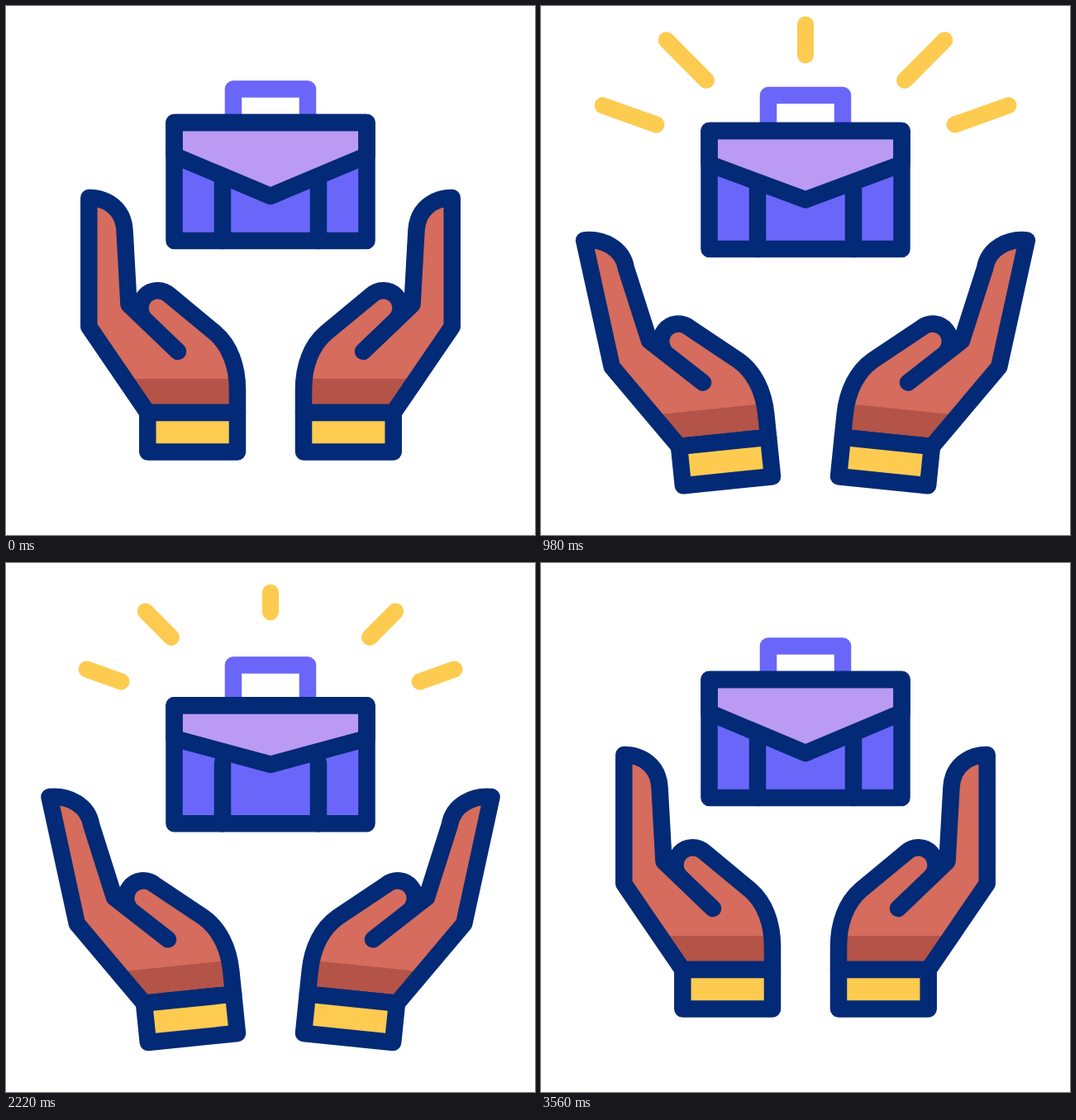
An HTML page that plays this animation: 640 by 640 pixels, repeating every 3600 ms.

```html
<!DOCTYPE html>
<html lang="en">
<head>
<meta charset="utf-8">
<title>Briefcase between two hands</title>
<style>
  html, body { margin: 0; width: 100%; height: 100%; overflow: hidden; background: #fff; }
  svg { display: block; width: 100%; height: 100%; }
  .line { stroke: #032a76; stroke-width: 20.5; stroke-linecap: round; stroke-linejoin: round; }
  .ray { stroke: #fdcb50; stroke-width: 20; stroke-linecap: round; }
</style>
</head>
<body>
<svg viewBox="0 0 640 640" fill="none">
  <g id="half">
    <path class="ray" data-ends="200 90 149 38.5"/>
    <path class="ray" data-ends="139.5 143.5 71 119"/>
    <g id="hand">
      <path id="skin" fill="#d56c5d"/>
      <path d="M143 451H280V492H171.3Z" fill="#b45348"/>
      <path id="outline" class="line"/>
      <path class="line" d="M171.3 492H280V539.6H171.3Z" fill="#fdcb50"/>
    </g>
  </g>
  <use href="#half" transform="matrix(-1 0 0 1 640 0)"/>
  <path class="ray" data-ends="320 59.5 320 20.5"/>
  <path id="handle" class="line" d="M275 146V100.5H365V146" style="stroke:#6a66fa"/>
  <g id="box">
    <path d="M203.5 141H436.5V284H203.5Z" fill="#6a66fa"/>
    <path class="line" d="M262 210V284M378 210V284"/>
    <path id="flap" class="line" fill="#ba9af2"/>
    <path class="line" d="M203.5 141H436.5V284H203.5Z"/>
  </g>
</svg>
<script>
const LOOP = 3600, HALF = 400, LAST_PEAK = 2800, RETURN = 480;
const $ = id => document.getElementById(id);
const ease = x => (1 - Math.cos(Math.PI * x)) / 2;
const clamp = x => Math.min(1, Math.max(0, x));

// Rises from rest to peak, swings between peak and low, then settles back to rest.
function swing(t, peak, low) {
  if (t <= HALF) return peak * ease(clamp(t / HALF));
  if (t >= LAST_PEAK) return peak * ease(1 - clamp((t - LAST_PEAK) / RETURN));
  return low + (peak - low) * ease(t / HALF);
}

function drawHand(t) {
  const drop = swing(t, 46.2, 17.3), angle = swing(t, 7, 5), lean = swing(t, 42, 0);
  const tip = 100.3 - lean, inner = -0.78 * lean;
  const d = `M${tip} 232L100.3 388L171.3 492H280V464C280 436 271 411 253 395.5L198 350` +
    `A21 21 0 0 0 169 380.5L148.5 361L${143.5 + inner} 271` +
    `C${142 + inner} 246 ${tip + 22.5} 232 ${tip} 232Z`;
  $('skin').setAttribute('d', d);
  $('outline').setAttribute('d', d + 'M148.5 361L208 418');
  $('hand').setAttribute('transform', `translate(0 ${drop}) rotate(${-angle} 280 539.6)`);
}

function drawCase(t) {
  const drop = swing(t - 60, 48, 0);
  $('box').setAttribute('transform', `translate(0 ${drop})`);
  $('handle').setAttribute('transform', `translate(0 ${0.735 * drop})`);
  $('flap').setAttribute('d', `M203.5 141H436.5V181L320 ${230 - 0.56 * drop}L203.5 181Z`);
}

function drawRays(t) {
  const u = t - 640, short = 0.61;
  const end = u < HALF ? ease(clamp(u / HALF)) : short + (1 - short) * ease(u / HALF);
  const start = ease(clamp((t - 3440) / 120));
  for (const ray of document.querySelectorAll('.ray')) {
    const [x1, y1, x2, y2] = ray.dataset.ends.split(' ').map(Number);
    const at = k => `${x1 + (x2 - x1) * k} ${y1 + (y2 - y1) * k}`;
    ray.setAttribute('d', start < end ? `M${at(start)}L${at(end)}` : '');
  }
}

function frame() {
  const t = performance.now() % LOOP;
  drawHand(t);
  drawCase(t);
  drawRays(t);
  requestAnimationFrame(frame);
}
frame();
</script>
</body>
</html>
```
